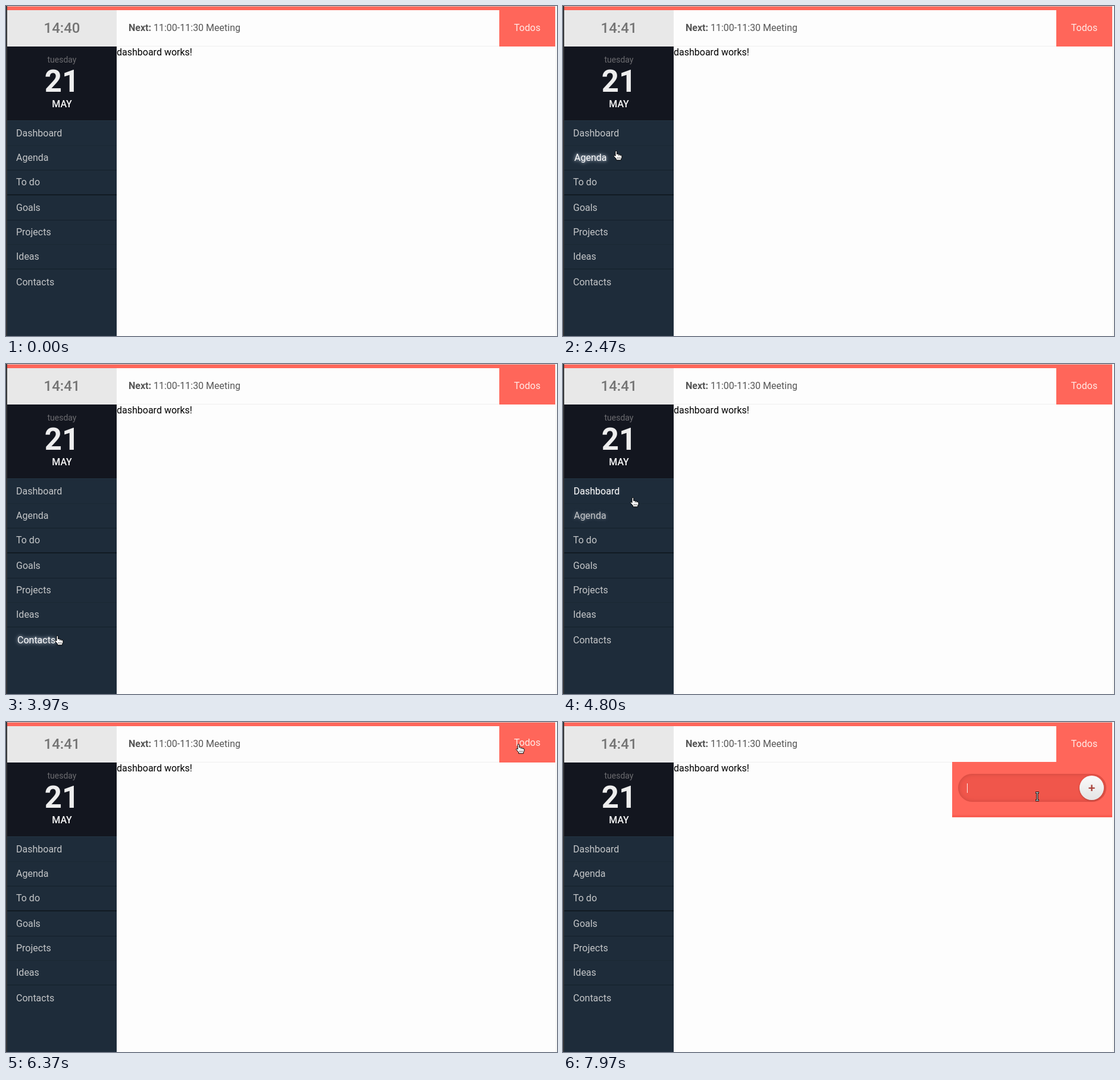
An HTML page for the animation above (8000 ms loop, 926 px wide and 554 px high).

```html
<!DOCTYPE html>
<html lang="en">
<head>
<meta charset="utf-8">
<title>Dashboard</title>
<style>
  html, body { margin: 0; width: 100%; height: 100%; overflow: hidden; }
  body { position: relative; background: #fdfdfd; font: 16px Roboto, sans-serif; }
  div, svg { position: absolute; box-sizing: border-box; white-space: nowrap; }
  #stage { left: 0; top: 0; width: 926px; height: 554px; overflow: hidden; }
  .center { text-align: center; }

  #strip { left: 0; top: 0; width: 923px; height: 7px; background: #ff665a; border-top: 1px solid #d8c4c0; }
  #edge { left: 0; top: 0; width: 2px; height: 554px; background: #343638; }
  #rightEdge { left: 924px; top: 0; width: 1px; height: 554px; background: #f0f0ec; }
  #clock { left: 2px; top: 7px; width: 184px; height: 61px; background: #e8e8e8; color: #747474; font-size: 24px; font-weight: 500; line-height: 60px; }
  #next { left: 186px; top: 7px; width: 643px; height: 61px; padding-left: 20px; line-height: 59px; color: #555; border-bottom: 1px solid #f0f0f0; }
  #todos { left: 829px; top: 7px; width: 94px; height: 61px; line-height: 59px; background: #ff665a; color: #ffeae6; }
  #todos div { width: 94px; }
  #content { left: 186px; top: 68px; color: #000; line-height: 19px; }

  #sidebar { left: 2px; top: 68px; width: 184px; height: 486px; background: #1e2c3a; }
  #date { left: 0; top: 0; width: 184px; height: 125px; background: #13161f; border-bottom: 1px solid #243442; }
  #date div { width: 184px; }
  #weekday { top: 12px; line-height: 20px; font-size: 14px; color: #6c6c70; }
  #day { top: 33px; line-height: 51px; font-size: 51px; font-weight: 700; color: #eee; }
  #month { top: 87px; line-height: 20px; font-weight: 500; color: #f8f8f8; }
  .item { left: 0; width: 184px; height: 41px; padding-left: 15px; line-height: 41px; color: #c4c6c8; }

  #panel { left: 654px; top: 67px; width: 269px; background: #ff665a; border-bottom: 4px solid #f95c50; overflow: hidden; }
  #field { left: 10px; top: 20px; width: 249px; height: 47px; border-radius: 24px; background: #f0564b; box-shadow: inset 0 0 6px 1px #d04a40; }
  #caret { left: 25px; top: 36px; width: 1px; height: 16px; background: #ffeae6; }
  #add { left: 214px; top: 23px; width: 41px; height: 41px; border-radius: 50%; line-height: 41px; font-size: 21px; font-weight: 500;
    background: linear-gradient(#fafafa, #e4e4e4); color: #a8443c; box-shadow: 0 1px 3px #a84038; }
  #cursor { left: 0; top: 0; overflow: visible; }
</style>
</head>
<body>
<div id="stage">
  <div id="strip"></div>
  <div id="clock" class="center"></div>
  <div id="next"><b>Next:</b> 11:00-11:30 Meeting</div>
  <div id="todos" class="center"><div id="todosLabel">Todos</div></div>
  <div id="content">dashboard works!</div>
  <div id="sidebar">
    <div id="date" class="center">
      <div id="weekday">tuesday</div>
      <div id="day">21</div>
      <div id="month">MAY</div>
    </div>
  </div>
  <div id="panel">
    <div id="field"></div>
    <div id="caret"></div>
    <div id="add" class="center">+</div>
  </div>
  <div id="edge"></div>
  <div id="rightEdge"></div>
  <svg id="cursor" width="20" height="24">
    <g id="hand" transform="translate(-4.5 -.5)" fill="#fff" stroke="#000" stroke-linejoin="round">
      <path d="M3.5 9.5V2.2Q3.5 .7 4.8 .7T6.2 2.2V6.2Q8.4 5.4 8.9 6.9Q10.8 6.2 11.4 7.7Q14.4 7.2 14.4 9.6V12L13.2 14V16.3H5V14.2L1 9.9Q.4 8.4 2 8.3Z"/>
      <path d="M8.9 7V9.3M11.4 7.8V9.6M7 11.5V14M9.2 11.5V14M11.4 11.5V14" stroke-width=".7"/>
    </g>
    <g id="beam" fill="none">
      <path d="M-3 -6.5H3M-3 6.5H3M0 -6.5V6.5" stroke="#000" stroke-width="3"/>
      <path d="M-2.5 -6.5H2.5M-2.5 6.5H2.5M0 -6.5V6.5" stroke="#fff"/>
    </g>
    <path id="arrow" d="M0 0V15L3.5 11.8L5.8 17L8.2 16L6 11H10.7Z" fill="#000" stroke="#fff"/>
  </svg>
</div>
<script>
const LOOP = 8000, FADE = 200, CLOCK_TICK = 2100, PANEL_OPEN = 6900, FOCUS = 7700;
const $ = id => document.getElementById(id);
const clamp = v => Math.max(0, Math.min(1, v));
const mix = (a, b, k) => a + (b - a) * k;

// Pointer hotspot over time: [ms, x, y]
const route = [
  [1300, 176, 138], [1670, 95, 177], [2000, 92, 200], [2300, 89, 243], [2530, 89, 243],
  [2900, 91, 310], [3330, 86, 400], [3700, 86, 456], [3970, 86, 456], [4170, 140, 448],
  [4450, 122, 330], [4730, 113, 234], [4800, 117, 224], [5000, 180, 172], [5400, 500, 92],
  [5830, 847, 40], [6100, 861, 37], [6950, 861, 37], [7250, 848, 69], [7700, 797, 125], [8000, 797, 125]
];

const items = [['Dashboard', 193], ['Agenda', 234], ['To do', 275], ['Goals', 318],
  ['Projects', 359], ['Ideas', 400], ['Contacts', 443]].map(([label, top]) => {
  const el = document.createElement('div');
  el.className = 'item';
  el.textContent = label;
  el.style.top = top - 68 + 'px';
  $('sidebar').append(el);
  return { el, box: [2, top, 186, top + 41] };
});

// Hairlines between the menu rows: [y, thickness, colour]
for (const [y, height, colour] of [[234, 1, '#1b2834'], [275, 1, '#14202a'], [316, 2, '#111a23'],
  [359, 1, '#14202a'], [400, 1, '#1b2834'], [441, 1, '#14202a']]) {
  const line = document.createElement('div');
  line.style.cssText = `left:0;top:${y - 68}px;width:184px;height:${height}px;background:${colour}`;
  $('sidebar').append(line);
}

function pointer(t) {
  const i = route.findIndex(stop => stop[0] > t);
  if (i < 1) return null;
  const [t0, x0, y0] = route[i - 1], [t1, x1, y1] = route[i];
  const k = (t - t0) / (t1 - t0);
  return [mix(x0, x1, k), mix(y0, y1, k)];
}

const inside = (p, [l, t, r, b]) => p && p[0] >= l && p[0] < r && p[1] >= t && p[1] < b;

// Share of the last FADE ms spent over the box: a linear hover transition
function hover(t, box) {
  const steps = 20;
  let hits = 0;
  for (let i = 0; i < steps; i++) if (inside(pointer(t - i * FADE / steps), box)) hits++;
  return hits / steps;
}

const todosBox = [829, 7, 923, 67];

function drawCursor(t) {
  const p = pointer(t);
  $('cursor').style.display = p ? '' : 'none';
  if (!p) return;
  const onButton = inside(p, todosBox) || items.some(item => inside(p, item.box));
  const onText = inside(p, [30, 80, 158, 185]) || t > PANEL_OPEN && inside(p, [664, 87, 866, 134]);
  const kind = onButton ? 'hand' : onText ? 'beam' : 'arrow';
  for (const id of ['hand', 'beam', 'arrow']) $(id).style.display = id === kind ? '' : 'none';
  $('cursor').style.transform = `translate(${Math.round(p[0])}px, ${Math.round(p[1])}px)`;
}

function draw(t) {
  $('clock').textContent = t < CLOCK_TICK ? '14:40' : '14:41';
  for (const { el, box } of items) {
    // The colour switches at once; the shift and the glow fade
    const k = hover(t, box), glow = k * k;
    el.style.paddingLeft = 15 + 2 * k + 'px';
    el.style.color = inside(pointer(t), box) ? '#fff' : '';
    el.style.textShadow = k ? `0 0 7px rgba(190, 200, 215, ${glow}), 0 0 4px rgba(170, 180, 195, ${glow * .6})` : 'none';
  }
  $('todosLabel').style.top = -2 * hover(t, todosBox) + 'px';
  const open = clamp((t - PANEL_OPEN) / 250);
  $('panel').style.display = open ? '' : 'none';
  $('panel').style.height = 93 * open + 'px';
  $('caret').style.opacity = t >= FOCUS ? 1 : 0;
  drawCursor(t);
}

function frame(now) {
  draw(now % LOOP);
  requestAnimationFrame(frame);
}
requestAnimationFrame(frame);
</script>
</body>
</html>
```
